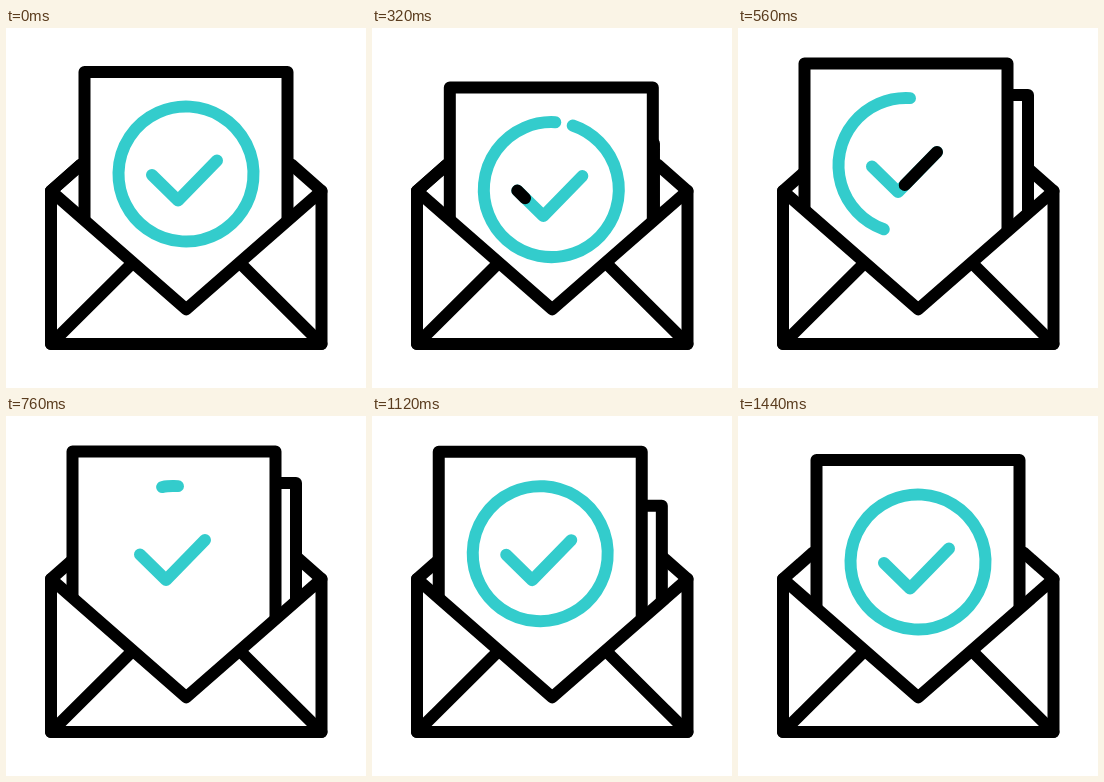
These frames come from a looping animation (360x360 px, 1480 ms). An HTML page:

```html
<!DOCTYPE html>
<html lang="en">
<head>
<meta charset="utf-8">
<title>Letter confirmed</title>
<style>
  html, body { margin: 0; width: 100%; height: 100%; overflow: hidden; background: #fff; }
  svg { display: block; width: 100vw; height: 100vh; }
  path { stroke: #000; stroke-width: 12; stroke-linecap: round; stroke-linejoin: round; fill: none; }
  .sheet { fill: #fff; }
  .teal { stroke: #33cccc; }
</style>
</head>
<body>
<svg viewBox="0 0 360 360">
  <path d="M45 163L75 136.500M315.500 163L285.500 136.500"/>
  <path id="back" class="sheet"/>
  <g id="front">
    <path id="page" class="sheet"/>
    <path id="ring" class="teal"/>
    <path class="teal" d="M67.500 103L93.500 128.500L132.500 88.500"/>
    <path id="ink"/>
  </g>
  <path id="flapTop" d="M45 163L75 136.500"/>
  <path class="sheet" d="M45 163L180.200 281.300L315.500 163V316H45Z"/>
  <path d="M45 316L125 236.500M315.500 316L235.500 236.500"/>
</svg>
<script>
const LOOP = 1480, STEP = 40, REST = 120;
const SIZE = 203, CX = 101.5, CY = 102, RADIUS = 67.5;
const TICK = [[67.5, 103], [93.5, 128.5], [132.5, 88.5]];
const el = id => document.getElementById(id);
const [back, front, page, ring, ink, flapTop] =
  ['back', 'front', 'page', 'ring', 'ink', 'flapTop'].map(el);

const ramp = (t, a, b) => Math.min(1, Math.max(0, (t - a) / (b - a)));
const smooth = u => u * u * (3 - 2 * u);

// keys: [time, value] pairs, eased between neighbours
function track(t, keys) {
  let v = keys[0][1];
  for (let i = 1; i < keys.length; i++) {
    const [a, from] = keys[i - 1], [b, to] = keys[i];
    v += (to - from) * smooth(ramp(t, a, b));
  }
  return v;
}

const sheet = (x, y, bottom) => `M${x} ${bottom}V${y}H${x + SIZE}V${bottom}`;

function ringPoint(deg) {
  const a = deg * Math.PI / 180;
  return `${CX + RADIUS * Math.sin(a)} ${CY - RADIUS * Math.cos(a)}`;
}

function arc(from, to) {
  const span = to - from;
  if (span <= 0) return '';
  const r = `A${RADIUS} ${RADIUS} 0 0 1 `;
  let d = 'M' + ringPoint(from);
  for (let i = 1; i <= 3; i++) d += r + ringPoint(from + span * i / 3);
  return span >= 360 ? d + 'Z' : d;
}

function tick(from, to) {
  if (to <= from) return '';
  const bend = 0.395;
  const at = u => {
    const [p, q, k] = u < bend
      ? [TICK[0], TICK[1], u / bend]
      : [TICK[1], TICK[2], (u - bend) / (1 - bend)];
    return `${p[0] + (q[0] - p[0]) * k} ${p[1] + (q[1] - p[1]) * k}`;
  };
  const corner = from < bend && to > bend ? 'L' + TICK[1].join(' ') : '';
  return 'M' + at(from) + corner + 'L' + at(to);
}

function draw(ms) {
  let t = Math.floor(ms % LOOP / STEP) * STEP;
  if (t < REST) t = 0;

  const x = track(t, [[100, 78.5], [220, 79.5], [250, 79.5], [560, 66.5], [1100, 66.5], [1340, 78.5]]);
  const y = track(t, [[100, 44], [300, 60], [560, 35.5], [1100, 35.5], [1340, 44]]);
  front.setAttribute('transform', `translate(${x} ${y})`);
  page.setAttribute('d', sheet(0, 0, 290 - y));

  const bx = track(t, [[280, 78.5], [560, 87], [1100, 87], [1340, 78.5]]);
  const by = track(t, [[200, 205], [400, 67], [1080, 67], [1235, 205]]);
  back.setAttribute('d', sheet(bx, by, 290));

  const start = 3.4;
  const wiped = 360 * ramp(t, 300, 778);
  const drawn = 360 * ramp(t, 780, 1064);
  ring.setAttribute('d', t < 780
    ? arc(start + wiped, start + 360)
    : arc(start, start + drawn));

  ink.setAttribute('d', tick(ramp(t, 480, 640), ramp(t, 300, 470)));
  flapTop.setAttribute('visibility', t < 440 ? 'visible' : 'hidden');
}

const begin = performance.now();
function loop() {
  draw(performance.now() - begin);
  requestAnimationFrame(loop);
}
loop();
</script>
</body>
</html>
```
